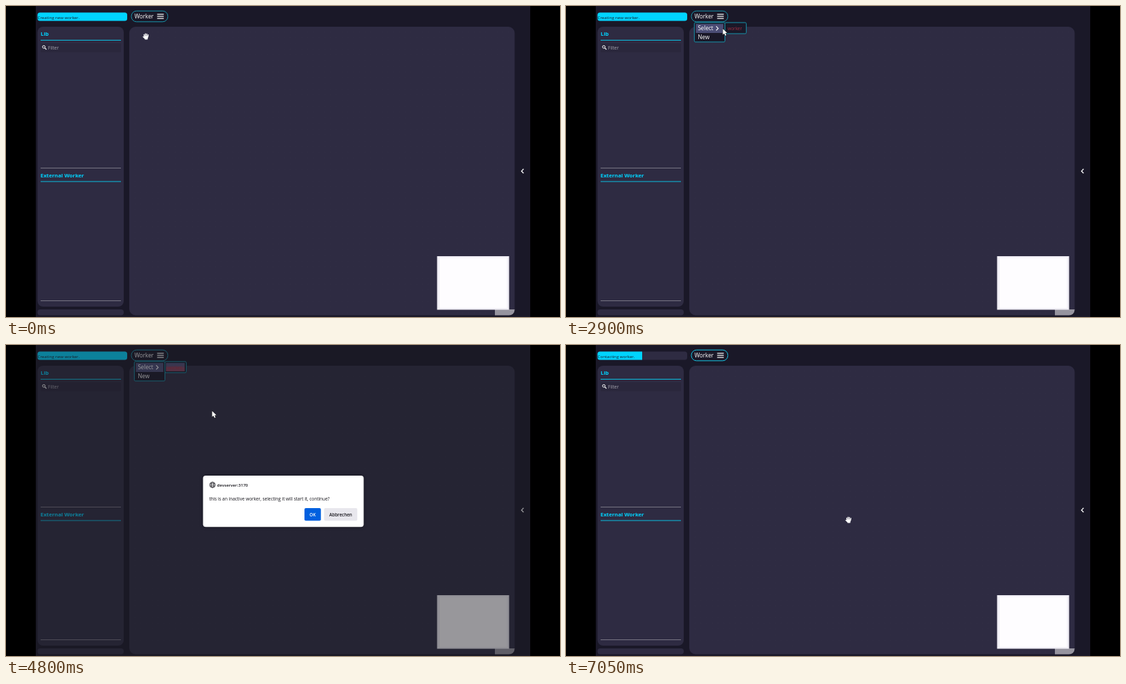
Write an HTML page with a canvas that moves like this. It is 800 px wide and 450 px high and loops after 8000 ms.

```html
<!DOCTYPE html>
<html lang="en">
<head>
<meta charset="utf-8">
<title>Worker selection</title>
<style>
  html, body { margin: 0; width: 100%; height: 100%; overflow: hidden; background: #000; }
  canvas { display: block; width: 100vw; height: 100vh; }
</style>
</head>
<body>
<canvas id="stage" width="800" height="450"></canvas>
<script>
const ctx = document.getElementById('stage').getContext('2d');
const LOOP = 8000;
const FONT = '"Open Sans", "Noto Sans", sans-serif';
const CYAN = '#00d4ff', PANEL = '#2e2b42', BASE = '#1a1828', WHITE = '#fff';

// Pointer stops: time, x, y
const PATH = [
  [0, 202, 44], [900, 202, 44], [1050, 219, 14.5], [2120, 219, 14.5],
  [2500, 212, 30], [2950, 227, 33], [3250, 236, 33], [3800, 241, 36],
  [4500, 241, 36], [5350, 438, 243], [6300, 438, 243],
  [6450, 397, 246], [7000, 397, 246], [7050, 408, 253]
];

const clamp = v => Math.max(0, Math.min(1, v));
const ramp = (t, from, to) => clamp((t - from) / (to - from));
const ease = p => p * p * (3 - 2 * p);

function pointerAt(t) {
  let i = 0;
  while (i < PATH.length - 2 && t >= PATH[i + 1][0]) i++;
  const [t0, x0, y0] = PATH[i], [t1, x1, y1] = PATH[i + 1];
  const p = ease(ramp(t, t0, t1));
  return [x0 + (x1 - x0) * p, y0 + (y1 - y0) * p];
}

function box(x, y, x2, y2, r, fill, stroke, width = 1) {
  ctx.beginPath();
  ctx.roundRect(x, y, x2 - x, y2 - y, r);
  if (fill) { ctx.fillStyle = fill; ctx.fill(); }
  if (stroke) { ctx.strokeStyle = stroke; ctx.lineWidth = width; ctx.stroke(); }
}

function line(points, color, width = 1) {
  ctx.beginPath();
  points.forEach(([x, y]) => ctx.lineTo(x, y));
  ctx.strokeStyle = color;
  ctx.lineWidth = width;
  ctx.stroke();
}

function text(str, x, y, size, color, weight = 400, align = 'left') {
  ctx.font = `${weight} ${size}px ${FONT}`;
  ctx.textAlign = align;
  ctx.fillStyle = color;
  ctx.fillText(str, x, y);
}

function drawSidebar() {
  box(45.5, 30, 170, 435, 8, PANEL);
  box(45.5, 439, 170, 447.5, 4, PANEL);
  text('Lib', 50, 43.2, 7.8, CYAN, 700);
  line([[50, 49.5], [166, 49.5]], '#0bbfe0');
  box(50, 54, 166, 67, 1, '#2a273c');
  ctx.beginPath();
  ctx.arc(54.6, 59.2, 1.9, 0, 7);
  ctx.strokeStyle = WHITE;
  ctx.lineWidth = 1;
  ctx.stroke();
  line([[56, 60.6], [58.4, 63]], WHITE, 1.1);
  text('Filter', 60.8, 63.2, 6.6, '#a5a3ae');
  line([[50, 234.5], [166, 234.5]], '#777583');
  text('External Worker', 49.8, 247.8, 7.75, CYAN, 700);
  line([[50, 254], [166, 254]], '#0bbfe0');
  line([[50, 426.5], [166, 426.5]], '#777583');
}

function drawEditor() {
  box(178, 30, 734.5, 447.5, 9, PANEL);
  ctx.fillStyle = 'rgba(255,255,255,.035)';
  for (let x = 186; x < 732; x += 8.3)
    for (let y = 37; y < 444; y += 8.3) ctx.fillRect(x, y, 0.8, 0.8);
  box(706, 439, 734.5, 447.5, [0, 0, 8, 0], '#96949f');
  box(622.5, 362, 726.5, 439.5, 0, '#f1eff6');
  box(626, 364.5, 723.5, 437, 0, '#fefdff');
  line([[747.4, 235.8], [744.4, 238.9], [747.4, 242]], WHITE, 1.3);
}

function drawTopBar(t) {
  const done = ramp(t, 5450, 5650);
  const end = 175 - 65 * ease(done);
  box(45.5, 9.5, 175, 21.5, 3.5, PANEL);
  box(45.5, 9.5, end, 21.5, done ? [3.5, 0, 0, 3.5] : 3.5, CYAN);
  text(t < 5450 ? 'Creating new worker.' : 'Contacting worker.', 45.6, 18.7, 6.13, '#17212f');

  const lit = t >= 5450;
  box(181, 7.2, 233.7, 22.8, 7.5, BASE, lit ? '#16c4e2' : '#1793aa');
  text('Worker', 185.4, 18, 8.2, WHITE);
  for (const y of [12, 15, 18]) line([[218.3, y], [227.8, y]], WHITE, 1.2);
}

function drawMenu(t, x) {
  const shown = ramp(t, 1230, 1400) * (1 - ramp(t, 5420, 5550));
  if (!shown) return;
  const sub = ramp(t, 2350, 2500);
  ctx.save();
  ctx.globalAlpha = shown;
  box(185.3, 24, 229.5, 52, 1.5, BASE, '#1793aa');
  if (sub) box(187.5, 26, 227.3, 39, 0, '#4b4d75');
  text('Select', 190.4, 35.4, 8.1, WHITE);
  line([[216.8, 29.4], [219.8, 32.4], [216.8, 35.4]], WHITE, 1.1);
  text('New', 190.4, 48, 8.1, WHITE);
  if (sub) {
    ctx.globalAlpha = shown * sub;
    box(229.5, 24, 260.3, 40, 1.5, BASE, '#1793aa');
    if (x > 231) {
      const tint = ctx.createLinearGradient(0, 26, 0, 38);
      tint.addColorStop(0, '#4b4e78');
      tint.addColorStop(0.4, '#5a4a70');
      tint.addColorStop(0.6, '#84405c');
      tint.addColorStop(1, '#80405c');
      box(231, 26, 258, 38, 0, tint);
    }
    text('worker', 233.2, 34.6, 6.4, '#a02c40');
  }
  ctx.restore();
}

function drawGlobe(x, y) {
  ctx.strokeStyle = '#15141a';
  ctx.lineWidth = 0.8;
  for (const w of [4, 1.8]) {
    ctx.beginPath();
    ctx.ellipse(x, y, w, 4, 0, 0, 7);
    ctx.stroke();
  }
  for (const dy of [-1.4, 1.4]) line([[x - 3.7, y + dy], [x + 3.7, y + dy]], '#15141a', 0.7);
}

function drawDialog(x, y) {
  ctx.fillStyle = 'rgba(28,27,34,.45)';
  ctx.fillRect(43, 0, 714, 450);
  ctx.save();
  ctx.shadowColor = 'rgba(0,0,0,.4)';
  ctx.shadowBlur = 5;
  box(284.5, 189, 516.5, 263.3, 4, WHITE);
  ctx.restore();
  drawGlobe(298.2, 202.4);
  text('devserver:3170', 304.8, 204.9, 6.1, '#15141a', 600);
  text('this is an inactive worker, selecting it will start it, continue?', 293.4, 225, 6.45, '#15141a');
  const over = x > 431 && x < 455 && y > 236 && y < 254;
  box(431, 236, 454.7, 254.3, 2, over ? '#054096' : '#0060df');
  text('OK', 442.8, 247.6, 6.3, WHITE, 600, 'center');
  box(459.3, 236, 507.3, 254.3, 2, '#e8e7ed');
  text('Abbrechen', 483.3, 247.6, 6.3, '#15141a', 600, 'center');
}

function drawArrow(x, y) {
  const shape = [[0, 0], [0, 8.6], [2, 6.8], [3.5, 10], [5, 9.3], [3.6, 6.2], [6.2, 6.1]];
  ctx.beginPath();
  shape.forEach(([dx, dy]) => ctx.lineTo(x + dx, y + dy));
  ctx.closePath();
  ctx.strokeStyle = '#111';
  ctx.lineWidth = 0.9;
  ctx.stroke();
  ctx.fillStyle = WHITE;
  ctx.fill();
}

function drawHand(x, y) {
  ctx.save();
  ctx.translate(x, y);
  ctx.lineCap = 'round';
  line([[-2.2, 0], [-2.6, -2.6]], WHITE, 1.4);
  line([[-0.5, 0], [-0.7, -3.9]], WHITE, 1.4);
  line([[1.2, 0], [1.3, -3.6]], WHITE, 1.4);
  line([[2.7, 0.8], [3.3, -2.2]], WHITE, 1.4);
  line([[-1.8, 2.4], [-3.8, 0.4]], WHITE, 1.4);
  ctx.beginPath();
  ctx.moveTo(-2.9, -0.6);
  ctx.lineTo(3.4, -0.6);
  ctx.lineTo(2.4, 4.6);
  ctx.lineTo(-1.4, 4.6);
  ctx.closePath();
  ctx.fillStyle = WHITE;
  ctx.fill();
  ctx.restore();
}

function drawBeam(x, y) {
  line([[x, y - 3.5], [x, y + 4.5]], '#e8e6ee', 0.9);
  for (const dy of [-3.7, 4.7]) line([[x - 1.6, y + dy], [x + 1.6, y + dy]], '#e8e6ee', 0.8);
}

function drawPointer(t, x, y) {
  if (t < 1000 || t >= 5400) drawHand(x, y);
  else if (t >= 3250 && t < 4050) drawBeam(x + 0.5, y);
  else drawArrow(x, y);
}

function render(t) {
  const [x, y] = pointerAt(t);
  ctx.fillStyle = '#000';
  ctx.fillRect(0, 0, 800, 450);
  ctx.fillStyle = BASE;
  ctx.fillRect(43, 0, 714, 450);
  drawSidebar();
  drawEditor();
  drawTopBar(t);
  drawMenu(t, x);
  if (t >= 4050 && t < 5400) drawDialog(x, y);
  drawPointer(t, x, y);
}

const start = performance.now();
function tick() {
  render((performance.now() - start) % LOOP);
  requestAnimationFrame(tick);
}
tick();
</script>
</body>
</html>
```
